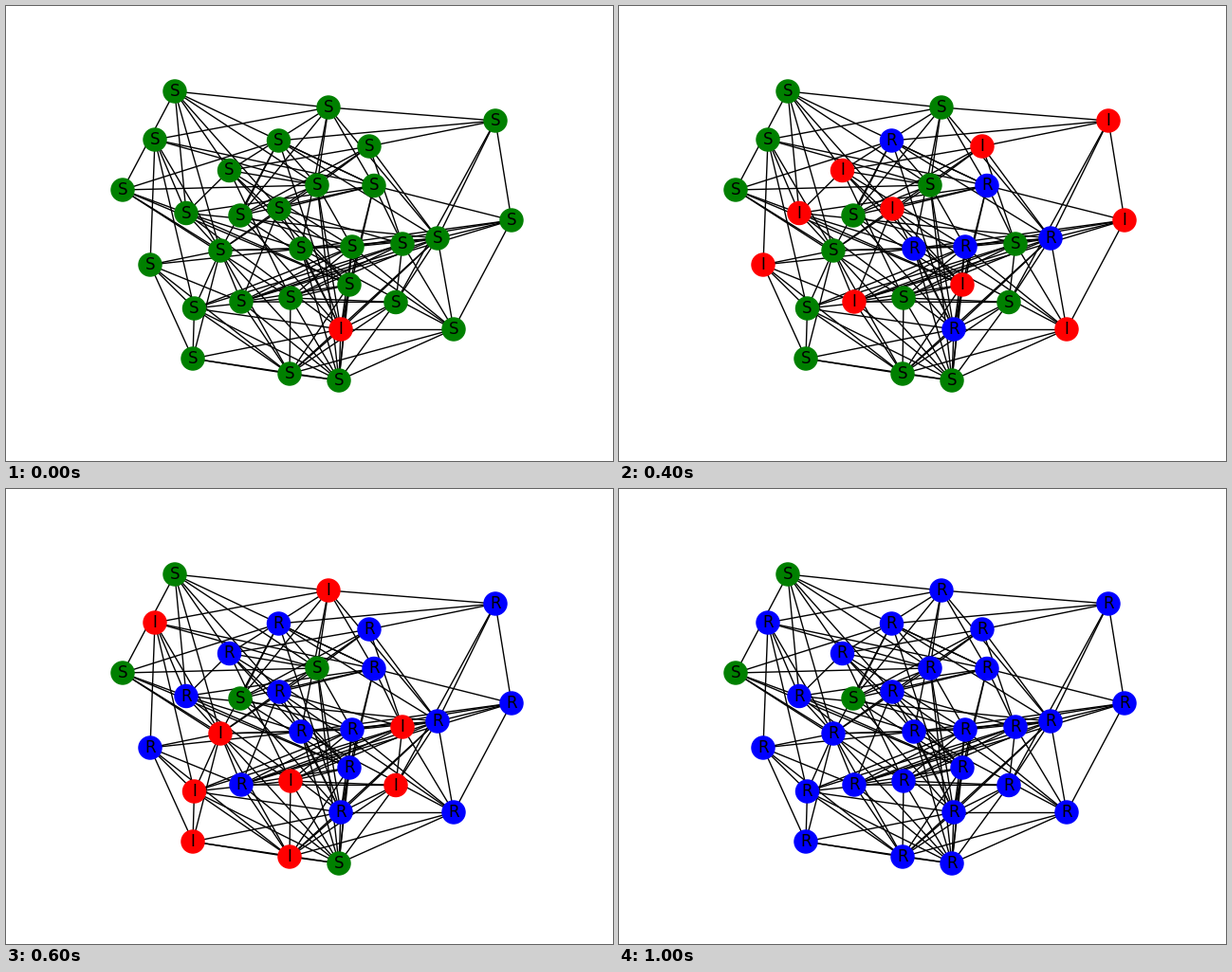
Write a matplotlib script that moves like this. It is 640 px wide and 480 px high and loops after 1.2 s.

```python
import matplotlib.pyplot as plt
from matplotlib.animation import FuncAnimation
from matplotlib.collections import LineCollection

WIDTH, HEIGHT, DPI = 640, 480, 100
STEPS, STEP_MS = 6, 200

NODES = [
    (178, 90), (157, 141), (123, 194), (340, 107), (287.5, 142), (383, 148),
    (516, 121), (235.5, 173.5), (328, 189), (388, 189.5), (190, 218.5),
    (247, 221), (288, 214), (533, 226), (226, 258), (311, 256), (365, 254),
    (418, 251), (455, 245), (152, 273), (362, 294), (198.5, 319), (248, 312),
    (300, 308), (411, 312.5), (353, 341), (472, 341), (197, 372),
    (299, 388), (351, 395),
]

# Contacts of each node with nodes of higher index.
CONTACTS = [
    [2, 3, 7, 8, 9, 10, 12, 14],
    [3, 8, 9, 10, 14, 19, 21],
    [4, 8, 10, 14, 20, 23],
    [6, 7, 8, 9, 11, 15, 18],
    [6, 8, 9, 11, 14, 18, 25],
    [6, 7, 8, 11, 12, 17, 18],
    [13, 18, 24],
    [8, 10, 15, 16, 20, 23],
    [11, 14, 16, 25, 29],
    [10, 11, 12, 13, 17, 20, 25],
    [14, 15, 18, 20, 25],
    [16, 20, 25],
    [14, 17, 20, 22, 25, 26],
    [15, 16, 18, 22, 26],
    [15, 16, 19, 21, 22, 27, 28, 29],
    [18, 19, 25, 26, 29],
    [18, 21, 22, 23, 25, 26, 29],
    [18, 21, 22, 23, 24, 26],
    [22, 23, 24, 25, 26, 28],
    [21, 22, 27, 28],
    [22, 23, 25, 28, 29],
    [23, 25, 27, 28, 29],
    [24, 28, 29],
    [24, 28, 29],
    [25, 28, 29],
    [26, 27, 28, 29],
    [28, 29],
    [28, 29],
    [29],
]

# Nodes that catch the infection at each step; they recover one step later.
OUTBREAK = [
    [25],
    [4, 9, 15, 16, 18],
    [5, 6, 7, 10, 12, 13, 19, 20, 22, 26],
    [1, 3, 14, 17, 21, 23, 24, 27, 28],
    [8, 29],
]
INFECTED_AT = {node: step for step, group in enumerate(OUTBREAK) for node in group}
COLORS = {"S": "green", "I": "red", "R": "blue"}


def state(node, step):
    start = INFECTED_AT.get(node, STEPS)
    return "S" if step < start else "I" if step == start else "R"


fig = plt.figure(figsize=(WIDTH / DPI, HEIGHT / DPI), dpi=DPI, facecolor="white")
ax = fig.add_axes([0, 0, 1, 1])
ax.set(xlim=(0, WIDTH), ylim=(HEIGHT, 0))
ax.axis("off")

segments = [(NODES[a], NODES[b]) for a, group in enumerate(CONTACTS) for b in group]
ax.add_collection(LineCollection(segments, colors="black", linewidths=1, zorder=1))
dots = ax.scatter(*zip(*NODES), s=300, linewidths=1, zorder=2)
labels = [
    ax.text(x, y, "S", size=12, family="DejaVu Sans", ha="center", va="center", zorder=3)
    for x, y in NODES
]


def update(step):
    states = [state(node, step) for node in range(len(NODES))]
    colors = [COLORS[s] for s in states]
    dots.set_facecolor(colors)
    dots.set_edgecolor(colors)
    for label, text in zip(labels, states):
        label.set_text(text)
    return [dots, *labels]


anim = FuncAnimation(fig, update, frames=STEPS, interval=STEP_MS, repeat=True, repeat_delay=0)
plt.show()
```
